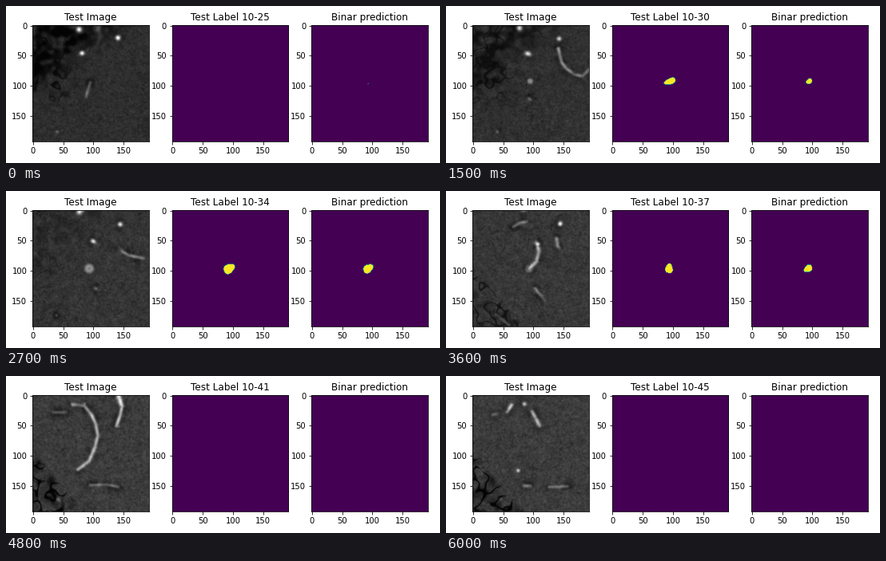
A matplotlib script for the animation above (6.3 s loop, 543 by 197 pixels).

```python
import numpy as np
import matplotlib.pyplot as plt
from matplotlib.animation import FuncAnimation

W, H, DPI = 543, 197, 72
LEFT, TOP, SIDE, PITCH = 33.25, 24.15, 145.45, 174.5
N, FIRST, COUNT, STEP = 192, 25, 21, 300
Y, X = np.mgrid[0:N, 0:N].astype(float)
AXIS = np.arange(N)
FREQ = np.fft.fftfreq(N)


def ease(v, lo, hi):
    t = np.clip((v - lo) / (hi - lo), 0, 1)
    return t * t * (3 - 2 * t)


def smooth_noise(seed, sigma):
    field = np.random.default_rng(seed).normal(size=(N, N))
    blur = np.exp(-2 * (np.pi * sigma) ** 2 * (FREQ[:, None] ** 2 + FREQ ** 2))
    field = np.fft.ifft2(np.fft.fft2(field) * blur).real
    return field / field.std()


def texture(k, seed, sigma, span=3):
    """Noise that changes gradually from slice to slice."""
    i, f = divmod(k / span, 1)
    a, b = (smooth_noise(seed + int(i) + j, sigma) for j in (0, 1))
    return a * np.cos(f * np.pi / 2) + b * np.sin(f * np.pi / 2)


class Vessel:
    """Tube through a few (x, y, slice) points; each scan shows where it crosses."""

    def __init__(self, level, width, *points):
        knots = np.arange(len(points))
        t = np.linspace(0, knots[-1], 14 * knots[-1] + 1)
        self.x, self.y, self.z = (np.interp(t, knots, c) for c in zip(*points))
        self.level = level * (0.85 + 0.15 * np.sin(5 * t))
        self.width = width

    def cut(self, k, spread=1, depth=1.0):
        near = np.exp(-((self.z - k) / depth) ** 2 / 2)
        on = near > 0.03
        if not on.any():
            return np.zeros((N, N))
        s = self.width * spread
        gx = np.exp(-((AXIS - self.x[on, None]) / s) ** 2 / 2)
        gy = np.exp(-((AXIS - self.y[on, None]) / s) ** 2 / 2)
        amp = (self.level * near)[on, None, None]
        return (amp * gy[:, :, None] * gx[:, None, :]).max(axis=0)


VESSELS = [
    # upper left and upper right arteries
    Vessel(1.0, 3.1, (76, 7, -1), (77, 5, 4), (77, 2, 9), (84, -2, 11)),
    Vessel(1.0, 2.6, (140, 20, -1), (142, 22, 5), (144, 23, 9), (144, 22, 12),
           (147, 18, 15), (141, 0, 16.5)),
    Vessel(0.75, 2.1, (147, 18, 15.5), (144, 32, 16), (138, 50, 16.3)),
    # central artery with its upper and lower branches
    Vessel(0.9, 2.5, (80, 46, -1), (85, 45, 3), (92, 47, 5), (100, 51, 9), (107, 56, 12)),
    Vessel(0.65, 2.3, (106, 55, 11.5), (109, 68, 12.5), (105, 84, 12.5), (93, 96, 11.5)),
    Vessel(0.65, 2.1, (107, 66, 15.5), (104, 48, 15.8), (97, 32, 16), (85, 17, 17),
           (66, 15, 17), (64, 16, 20), (57, 27, 20.5)),
    Vessel(0.6, 2.1, (107, 66, 15.5), (103, 84, 16), (93, 108, 16), (75, 122, 16.3),
           (75, 124, 20)),
    Vessel(0.55, 2.2, (98, 27, 20), (104, 38, 20), (110, 50, 20.5)),
    Vessel(0.7, 2.3, (85, 15, 17), (85, 14, 21)),
    # winding branch on the right
    Vessel(0.5, 2, (182, 88, 2.8), (168, 80, 3.4), (155, 72, 4.8), (146, 60, 5.5),
           (141, 38, 5.5)),
    Vessel(0.38, 1.9, (155, 72, 5), (167, 81, 5), (180, 84, 5.5), (191, 73, 6)),
    Vessel(0.45, 2, (182, 79, 8), (158, 74, 9), (148, 68, 9.5), (140, 58, 11.5), (138, 46, 12.5)),
    # faint small vessels
    Vessel(0.3, 1.9, (95, 94, 0), (91, 106, 0), (88, 117, 0.5), (92, 120, 4),
           (104, 129, 9), (103, 129, 12), (118, 148, 12.5)),
    Vessel(0.35, 1.9, (95, 148, 16.5), (121, 147, 16), (141, 151, 16.5), (126, 151, 20),
           (156, 150, 20.5)),
    Vessel(0.35, 1.9, (85, 149, 20), (95, 149, 20)),
    Vessel(0.3, 1.9, (67, 27, 12), (77, 21, 12), (89, 18, 12.5)),
    Vessel(0.3, 2, (34, 28, 16), (55, 28, 16.5), (33, 32, 20)),
    Vessel(0.15, 3.2, (108, 4, 0), (112, 17, 0), (105, 36, 0)),
    Vessel(0.25, 1.8, (40, 175, -1), (42, 176, 2), (38, 172, 12), (60, 189, 12),
           (41, 171, 16), (48, 172, 21)),
]


def centre(k):
    turn = np.pi * min(k, 9) / 9
    return 93 + 1.7 * np.sin(turn), 94 + 2 * np.cos(2 * turn)


def blob(k, rx, ry, wobble):
    """Slightly uneven ellipse around the aneurysm's centre."""
    cx, cy = centre(k)
    u, v = (X - cx) / rx, (Y - cy + 0.25 * (X - cx) * (rx > ry)) / ry
    a = np.arctan2(v, u)
    return (np.hypot(u, v) <= 1 + wobble * np.sin(3 * a + k)).astype(float)


def label(k):
    r = 8.7 * np.sqrt(max(0, 1 - ((k - 8.5) / 6) ** 2))
    stretch = np.exp(0.06 * (10 - k))
    return blob(k, r * stretch, r / stretch, 0.08) if r else np.zeros((N, N))


def guess_radius(k):
    return 0.6 + 7.1 * ease(k, 0, 9) - 0.4 * max(0, k - 9)


def prediction(k):
    r = guess_radius(k)
    return blob(k, r * 1.06, r * 0.95, 0.07) if k < 16 else np.zeros((N, N))


def scan(k):
    patches = texture(k, 40, 4)
    folds = np.exp(-(texture(k, 60, 5) / 0.3) ** 2)
    upper = (1 - ease(k, 0, 14)) * (1 - ease(X / 150 + Y / 115, 0.6, 1.25))
    lower = ease(k, 7, 15) * ease(0.85 * (Y - 95) - X, -8, 8)
    side = (1 - ease(k, 3, 14)) * (1 - ease(X, 30, 95)) * (1 - ease(Y, 90, 160))
    dark = np.maximum(upper * np.clip(0.65 + 0.35 * patches, 0, 1),
                      np.maximum(lower, 0.8 * side) * np.clip(folds + 0.2 * patches + 0.15, 0, 1))
    halo, glow = 0, 0
    for vessel in VESSELS:
        halo = np.maximum(halo, vessel.cut(k, spread=2.8, depth=1.5) / vessel.level.max())
        glow = np.maximum(glow, vessel.cut(k))
    dark = np.maximum(dark, 0.75 * halo * np.clip(0.5 + 0.5 * patches, 0, 1))

    cx, cy = centre(k)
    r = np.hypot(X - cx, Y - cy) / max(2.5, guess_radius(k))
    bulge = np.exp(-r ** 4) - 0.4 * np.exp(-(r / 0.35) ** 2) * ease(k, 5, 9)
    glow = np.maximum(glow, 0.42 * max(0, np.sin(np.pi * k / 16)) * bulge)

    grain = 1 + 0.09 * smooth_noise(900 + k, 0.9) + 0.04 * texture(k, 80, 2.5)
    base = 0.18 + 0.055 * ease(k, 0, 18)
    return np.clip(base * grain * (1 - np.clip(dark, 0, 0.92)) + glow, 0, 1)


fig = plt.figure(figsize=((W + 0.01) / DPI, (H + 0.01) / DPI), dpi=DPI, facecolor="white")


def panel(i, title, cmap):
    ax = fig.add_axes([(LEFT + i * PITCH) / W, 1 - (TOP + SIDE) / H, SIDE / W, SIDE / H])
    im = ax.imshow(np.zeros((N, N)), cmap=cmap, vmin=0, vmax=1, aspect="auto")
    ax.set_xticks(range(0, N, 50))
    ax.set_yticks(range(0, N, 50))
    ax.tick_params(labelsize=10)
    return im, ax.set_title(title, fontsize=12)


scan_im, _ = panel(0, "Test Image", "gray")
label_im, label_title = panel(1, "", "viridis")
pred_im, _ = panel(2, "Binar prediction", "viridis")


def draw(k):
    scan_im.set_data(scan(k))
    label_im.set_data(label(k))
    pred_im.set_data(prediction(k))
    label_title.set_text(f"Test Label 10-{FIRST + k}")
    return scan_im, label_im, pred_im, label_title


anim = FuncAnimation(fig, draw, frames=COUNT, interval=STEP, repeat=True, repeat_delay=0)
plt.show()
```
